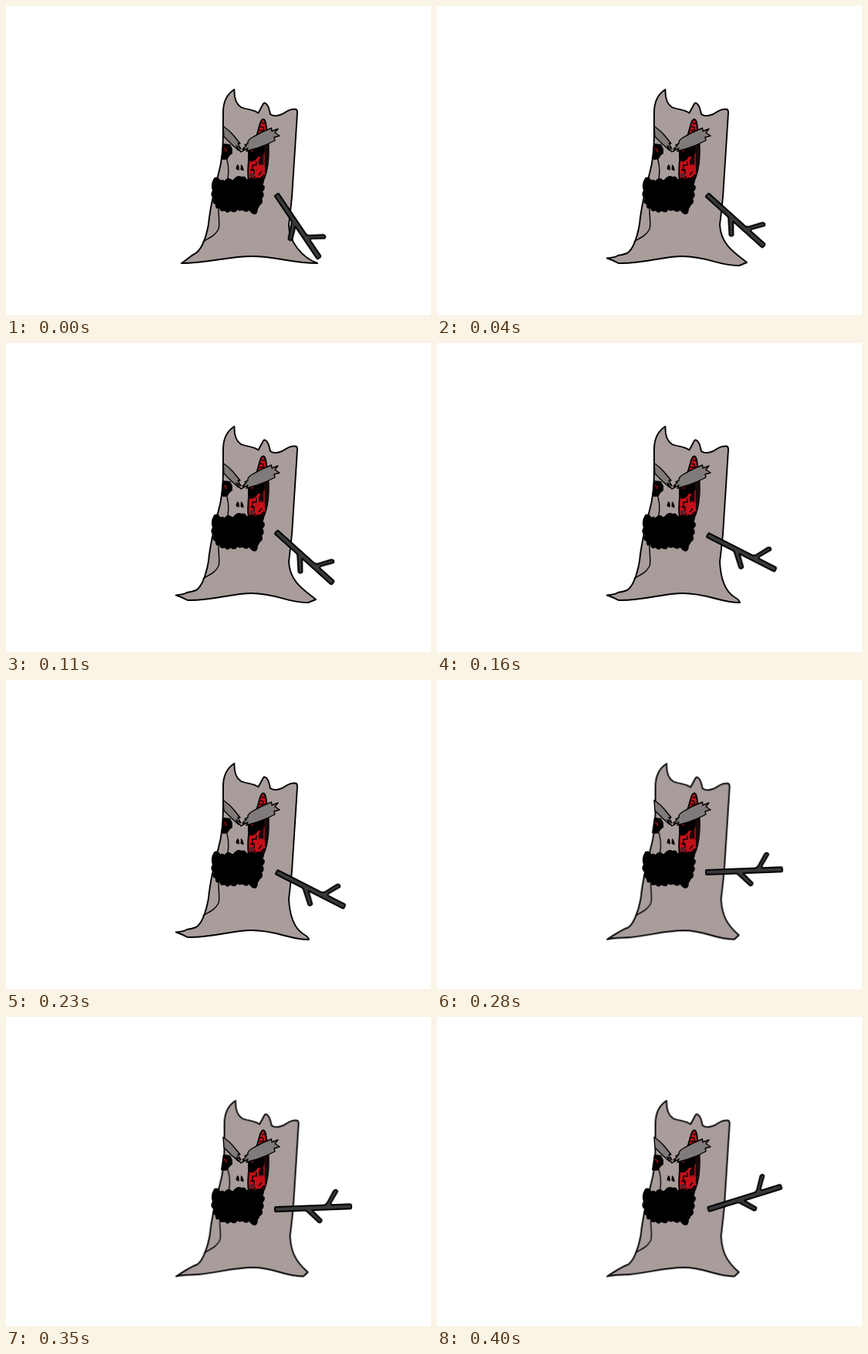
Recreate the animation shown at these times as an HTML page without scripts. Size 550 px wide and 400 px high, loop 440 ms.

```html
<!DOCTYPE html>
<html lang="en">
<head>
<meta charset="utf-8">
<title>Angry stump waving a branch</title>
<style>
  html, body { margin: 0; width: 100%; height: 100%; overflow: hidden; background: #fff; }
  svg { display: block; width: 100%; height: 100%; }

  .ink { stroke: #000; stroke-width: 1.9; stroke-linecap: round; stroke-linejoin: round; }
  .thin { stroke-width: 1.4; }
  .bark { fill: #a89d9b; }
  .brow { fill: #807a7a; }
  .wood { fill: #363839; }
  .patch { fill: #c51019; }
  .line { fill: none; }
  .wire { fill: none; stroke: #0d0305; stroke-width: 1.4; }
  .glow { fill: none; stroke: #c51019; stroke-width: 1.3; }

  /* Every pose is held, then swapped at once */
  .body, .feet, .arm { animation: 440ms step-end infinite; }
  .body { animation-name: lean; }
  .feet { animation-name: shuffle; }
  .arm { animation-name: wave; }

  @keyframes lean {
    0% { transform: none; }
    63.636%, 100% { transform: translate(1.6px, .3px); }
  }
  @keyframes shuffle {
    0% { d: path("M262 283C259 299 253 316 244 321C239 323 234 329 227 333C262 333 287 324 318 324C348 324 372 333 403 333C384 326 366 306 366 283"); }
    9.091% { d: path("M262 283C259 299 254 315 246 320Q241 322 234 323C230 326 225 325.5 220 326.5Q228 329 235 333C267 334 291 324 318 324C350 324 366 337 391 336L401 332C386 320 367 309 366 283"); }
    36.364% { d: path("M262 283C259 299 254 315 246 320Q241 322 234 323C230 326 225 325.5 220 326.5Q228 329 235 333C267 334 291 324 318 324C350 324 366 336 392 336Q391 332 385 329C374 322 367 306 366 283"); }
    63.636%, 100% { d: path("M262 283C259 299 253 315 246 320Q239 322 218.5 335.5C228 333 236 334 247 333C273 331 291 324 318 324C346 324 356 335 383 335.5Q386 333 389 330C374 317 367 305 366 283"); }
  }
  @keyframes wave {
    0% { transform: translate(350px, 244px) rotate(56deg); }
    9.091% { transform: translate(349.5px, 244.5px) rotate(42deg); }
    36.364% { transform: translate(350px, 248.5px) rotate(27deg); }
    63.636% { transform: translate(348px, 249px) rotate(-2.2deg); }
    90.909%, 100% { transform: translate(351px, 249px) rotate(-17.3deg); }
  }
</style>
</head>
<body>
<svg viewBox="0 0 550 400">
  <g class="body">
    <path class="ink bark" d="M262 283C264 262 270 236 275 217C280 200 281 184 281 164V138C281 125 286 114 295.500 108C295 121 298 127 304 131C311 134 321 134 326.500 138.500L333 126.500Q335 124 338 128C341 132 341 136 342 140C347 144 356 142 364 136Q369 133 374 133.500Q377 133.500 377 138L370 247Q368 267 366 283"/>
    <path class="ink bark feet"/>
    <path class="ink line thin" d="M283 192C288 201 289 211 287 225M275 261C275 274 277 284 275 289C270 298 263 300 255 305"/>
  </g>

  <g id="face">
    <path class="ink patch" d="M333 146.500C337 148 336 155 338 163C341 184 341 211 332 228Q322 231 315 228C312 222 313 207 315 190Q323 175 328 155Q330 147 333 146.500Z"/>
    <path fill="#18090b" d="M332 176L339 178C341 198 340 214 332 228L329 222L335 216V207H327V200L331 192Z"/>
    <path class="wire" d="M331 152H335M329 156L333 157V160M328 161H336M324 201V206H319V214M316 212H321V218M327 219L331 214M324 223H332M322 229V220M316 223H322"/>
    <path class="glow" d="M334 190V206H328V212M331 217H336"/>
    <circle cx="318" cy="219" r="3" fill="#55242a"/>

    <path d="M281 178L290 179L293 185V191Q289 193 287 198Q282 200 278 198Z"/>
    <path d="M313 186L327 180L334 178V191Q331 196 326 195Q322 203 315 201L313 196Z"/>
    <path d="M282 184L285 186V189M317 187L320 188" fill="none" stroke="#a30c13" stroke-width="1.500"/>

    <path class="ink brow thin" d="M281 155.500Q289 161 294 167L303 178L300 178L304 185L298 181L301 187L292 179L282 169Z"/>
    <path class="ink brow thin" d="M306 185L311 181L309 180L313 178Q312 174 318 170.500Q330 163 343.500 158L344 162L352 159L348 164L354 168L347 170L348 174Q337 180 325 184L311 188L313 184L306 188L309 185Z"/>
    <path class="ink line thin" d="M301 185L304 189L307 187"/>
    <path d="M299.500 205Q302.500 206 301.500 213L297.500 211Q298 207 299.500 205ZM304 205Q307.500 207 307.500 213.500L303.500 212Z"/>

    <path class="ink" d="M270 223Q274 221 277 227Q280 224 283 228Q286 222 291 225Q293 228 296 224Q300 219 305 222Q310 220 311 226Q317 221 321 226Q325 222 332 225Q334 228 331 231Q337 235 331 240Q335 246 330 249Q333 255 328 257Q327 260 325 262Q325 271 319 268Q316 266 315 263Q311 268 306 263Q302 266 299 262Q297 269 290 264Q287 269 283 264Q277 267 277 260Q271 264 272 256Q266 255 270 249Q264 245 268 239Q265 231 270 223Z"/>
  </g>

  <path class="ink wood arm" d="M1 -3H64Q67 -4 68 -6L77 -21Q80 -24 82 -20L73 -6Q72 -3 74 -3H97Q99 -3 99 -1V2Q99 3 97 3H48L60 16Q60 20 56 19L41 4Q40 3 37 3H1Q0 3 0 1V-1Q0 -3 1 -3Z"/>
</svg>
</body>
</html>
```
